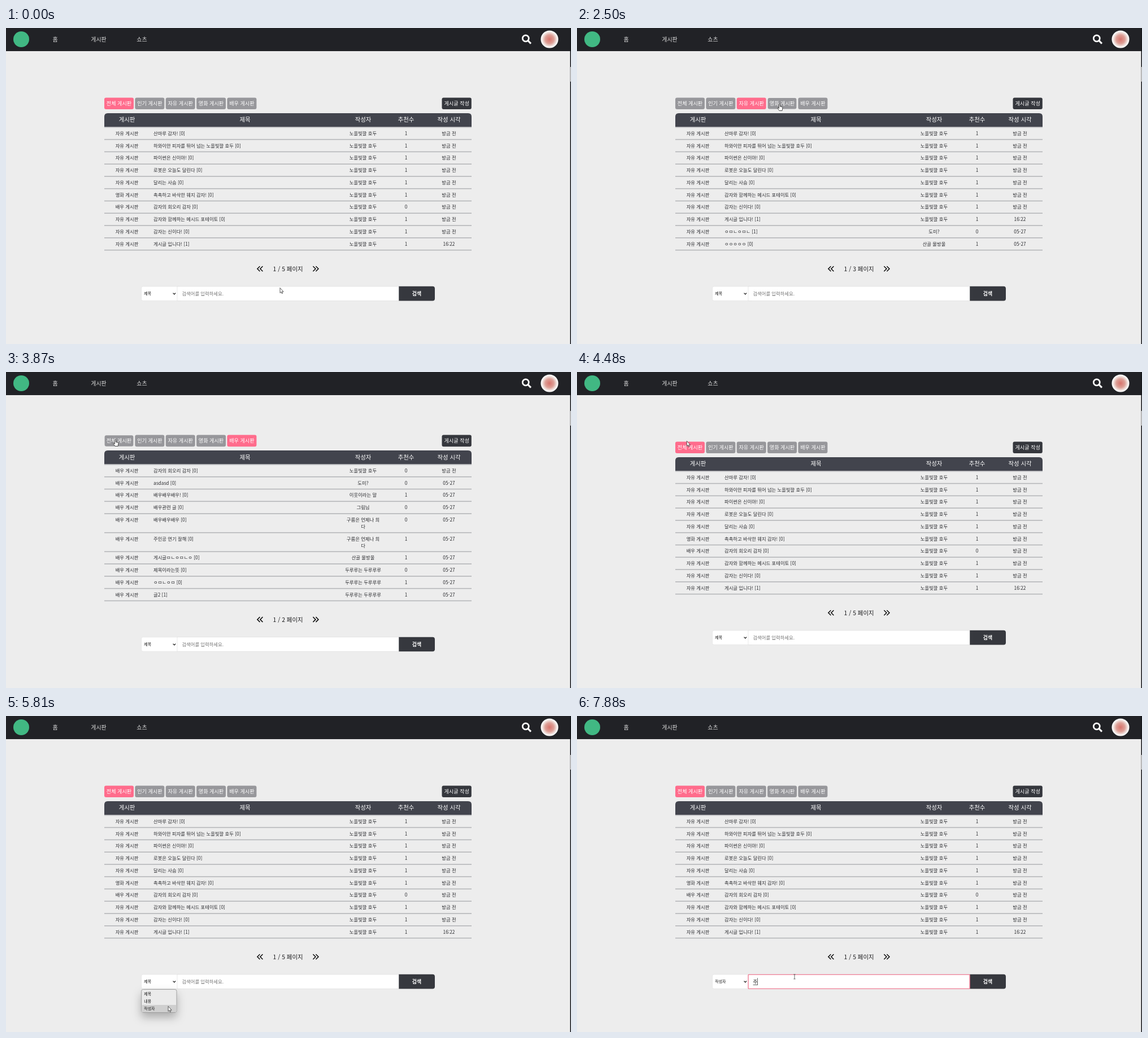
Animation of 1000x560 px, one loop 8000 ms. Source, as an HTML page:

```html
<!DOCTYPE html>
<html lang="ko">
<head>
<meta charset="utf-8">
<title>게시판</title>
<style>
html, body { margin: 0; width: 100%; height: 100%; overflow: hidden; background: #ededed; }
svg { display: block; width: 1000px; height: 560px; }
text { font-family: "Noto Sans CJK KR", "Noto Sans CJK", "Noto Sans CJK JP", "Noto Sans", sans-serif; white-space: pre; }
</style>
</head>
<body>
<svg viewBox="0 0 1000 560">
  <defs>
    <radialGradient id="avatar">
      <stop offset="0" stop-color="#d8736c"/><stop offset=".5" stop-color="#dda097"/>
      <stop offset=".85" stop-color="#f6efec"/><stop offset="1" stop-color="#fff"/>
    </radialGradient>
    <filter id="shadow" x="-60%" y="-60%" width="220%" height="240%">
      <feDropShadow dx="0" dy="8" stdDeviation="8" flood-opacity=".28"/>
    </filter>
  </defs>
  <rect width="1000" height="560" fill="#ededed"/>
  <g id="page"></g>
  <g id="pointer">
    <circle id="press" r="6" fill="#e8e000" opacity=".75"/>
    <path id="cursor"/>
  </g>
</svg>
<script>
const LOOP = 8000;
const $ = id => document.getElementById(id);

// Fields: board | title | author ("/" breaks the line) | likes | time
const ME = '노을빛깔 호두';
const mine = (board, title, likes = 1, time = '방금 전') => `${board}|${title}|${ME}|${likes}|${time}`;
const old = (board, title, author, likes) => `${board}|${title}|${author}|${likes}|05-27`;

const post = {
  hill: mine('자유', '산마루 감자! [0]'),
  pizza: mine('자유', `하와이안 피자를 뛰어 넘는 ${ME} [0]`),
  python: mine('자유', '파이썬은 신이야! [0]'),
  robot: mine('자유', '로봇은 오늘도 달린다 [0]'),
  deer: mine('자유', '달리는 사슴 [0]'),
  wedge: mine('영화', '촉촉하고 바삭한 웨지 감자! [0]'),
  twist: mine('배우', '감자의 회오리 감자 [0]', 0),
  mashed: mine('자유', '감자와 함께하는 메시드 포테이토 [0]'),
  god: mine('자유', '감자는 신이다! [0]'),
  first: mine('자유', '게시글 입니다! [1]', 1, '16:22')
};
const pick = names => names.split(' ').map(n => post[n]);
const CLOUD = '구름은 언제나 희/다', DURU = '두루루는 두루루루', DROP = '산골 물방울';

const boards = [
  { name: '전체', pages: 5, rows: pick('hill pizza python robot deer wedge twist mashed god first') },
  { name: '인기', pages: 1, rows: pick('first god mashed wedge deer robot python pizza hill twist') },
  { name: '자유', pages: 3, rows: [...pick('hill pizza python robot deer mashed god first'),
    old('자유', 'ㅇㅁㄴㅇㅁㄴ [1]', '도미?', 0), old('자유', 'ㅇㅇㅇㅇㅇ [0]', DROP, 1)] },
  { name: '영화', pages: 2, rows: [post.wedge,
    old('영화', 'asdasd [0]', '도미?', 0), old('영화', '영화영화영화! [0]', '이웃이라는 말', 1),
    old('영화', '영화 추천 글 [0]', CLOUD, 0), old('영화', '영화관련 글 [0]', '그림님', 1),
    old('영화', '영화 재밌다 [0]', CLOUD, 1), old('영화', '게시글ㅁㄴㅇ [0]', DROP, 1),
    old('영화', '제목이라는뜻 [0]', DURU, 0), old('영화', 'ㅇㅁㄴㅇ [0]', DURU, 1), old('영화', '글1 [0]', DURU, 0)] },
  { name: '배우', pages: 2, rows: [post.twist,
    old('배우', 'asdasd [0]', '도미?', 0), old('배우', '배우배우배우! [0]', '이웃이라는 말', 1),
    old('배우', '배우관련 글 [0]', '그림님', 0), old('배우', '배우배우배우 [0]', CLOUD, 0),
    old('배우', '주인공 연기 잘해 [0]', CLOUD, 1), old('배우', '게시글ㅁㄴㅇㅁㄴㅇ [0]', DROP, 1),
    old('배우', '제목이라는뜻 [0]', DURU, 0), old('배우', 'ㅇㅁㄴㅇㅁ [0]', DURU, 1), old('배우', '글2 [1]', DURU, 1)] }
];

// Timelines: [start, value]
const boardTimes = [[0, 0], [1230, 1], [2060, 2], [2970, 3], [3660, 4], [4420, 0]];
const optionTimes = [[0, -1], [5080, 0], [5240, 1], [5780, 2]];
const typedTimes = [[0, ''], [7780, 'ㅈ'], [7880, '주']];
const caretTimes = [[0, 0], [6480, 1], [7010, 0], [7550, 1]];
const presses = [[1140, 1230], [1960, 2050], [2800, 2940], [3580, 3650], [4330, 4410], [4880, 4950], [6020, 6100], [6450, 6570]];
// Pointer moves: start, end, x, y
const moves = [
  [0, 0, 485, 460.5], [30, 270, 246.5, 133.5], [1520, 1850, 306, 134], [2180, 2480, 358.5, 134.5],
  [3030, 3380, 412, 112.5], [3680, 3860, 193.5, 119.5], [4460, 4860, 294.5, 473], [5090, 5180, 293, 485],
  [5210, 5280, 291, 494], [5720, 5850, 286, 520], [6140, 6430, 352.5, 482.5], [6570, 6810, 371, 473], [6840, 7010, 385, 462]
];

const shapes = {
  arrow: ['M0 0V9L2 7.2 3.3 10.2 4.7 9.6 3.4 6.8H6.1Z', '#fff', '#333'],
  hand: ['M-1 1Q0-.7 1 1V4.6L4.6 5.4Q5.6 5.8 5.4 7L4.6 12H-.4L-3.4 8Q-3.6 6.6-2.4 6.8L-1 8Z', '#fff', '#222'],
  beam: ['M-1.6-4H1.6M0-4V4M-1.6 4H1.6', 'none', '#444']
};

const valueAt = (steps, t) => steps.filter(s => s[0] <= t).pop()[1];
const ease = p => p * p * (3 - 2 * p);

function pointerAt(t) {
  let x, y;
  for (const [from, to, mx, my] of moves) {
    if (t < from) break;
    const p = t >= to ? 1 : ease((t - from) / (to - from));
    x = p === 1 ? mx : x + (mx - x) * p;
    y = p === 1 ? my : y + (my - y) * p;
  }
  return [x, y];
}

const rect = (x, y, w, h, fill, r = 0, more = '') =>
  `<rect x="${x}" y="${y}" width="${w}" height="${h}" rx="${r}" fill="${fill}" ${more}/>`;
const path = (d, stroke, width, fill = 'none') =>
  `<path d="${d}" fill="${fill}" stroke="${stroke}" stroke-width="${width}"/>`;
// y is the optical middle of the line
const label = (s, x, y, size, fill, anchor = 'middle', weight = 400) =>
  `<text x="${x}" y="${(y + size * .37).toFixed(2)}" font-size="${size}" fill="${fill}" text-anchor="${anchor}" font-weight="${weight}">${s}</text>`;

const TAB = { x: 174, step: 54.35, w: 52, h: 20.7 };
const ROW = 21.78, LINE = 11.85;
const isTall = row => row.includes('/');
const shiftOf = board => board.rows.filter(isTall).length * LINE / 2;

function navbar() {
  return rect(0, 0, 1000, 41, '#212226') + rect(998.5, 0, 1.5, 560, '#15161a') + rect(998.5, 69, 1.5, 26, '#c9c9c9')
    + '<circle cx="27" cy="20" r="14" fill="#41b883"/><circle cx="962" cy="20" r="15.5" fill="url(#avatar)"/>'
    + [['홈', 87], ['게시판', 164], ['쇼츠', 240.5]].map(([s, x]) => label(s, x, 20, 10, '#dcdcdc', 'middle', 500)).join('')
    + '<circle cx="919.8" cy="18.4" r="5.5" fill="none" stroke="#fff" stroke-width="2.7"/>' + path('M923.8 22.4L929 27.6', '#fff', 3);
}

function tabs(active, hover, y) {
  return boards.map((b, i) => {
    const x = TAB.x + i * TAB.step, inset = i === hover ? .6 : 0;
    return rect(x + inset, y + inset, TAB.w - 2 * inset, TAB.h - 2 * inset, i === active ? '#ff6c8c' : '#97979b', 3)
      + label(`${b.name} 게시판`, x + TAB.w / 2, y + 10.4, 9.1, '#fff', 'middle', 500);
  }).join('') + rect(771.5, y, 52.3, TAB.h, '#35373d', 3) + label('게시글 작성', 797.7, y + 10.4, 9.1, '#fff', 'middle', 500);
}

function table(rows, top) {
  let out = path(`M174 ${top + 24.5}V${top + 6}q0-6 6-6H818q6 0 6 6V${top + 24.5}Z`, 'none', 0, '#42444d');
  [['게시판', 214], ['제목', 423], ['작성자', 632], ['추천수', 708], ['작성 시각', 784]]
    .forEach(([s, x]) => out += label(s, x, top + 11.7, 10.4, '#fff', 'middle', 500));
  const rule = y => rect(174, y - .8, 650, 1.6, '#b5b6b9');
  let y = top + 24.9;
  out += rule(y);
  for (const row of rows) {
    const [board, title, author, likes, time] = row.split('|');
    const mid = y + 10.9, cell = (s, x, dy = 0, anchor) => label(s, x, mid + dy, 8.33, '#2c2d31', anchor);
    out += cell(`${board} 게시판`, 214) + cell(title, 261, 0, 'start') + cell(likes, 708) + cell(time, 784);
    author.split('/').forEach((part, i) => out += cell(part, 632, i * LINE));
    y += ROW + (isTall(row) ? LINE : 0);
    out += rule(y);
  }
  return out;
}

function pager(pages, y) {
  const chevrons = (x, d) => [0, 5].map(o => path(`M${x + d * o} ${y - 4.5}l${-d * 4.5} 4.5l${d * 4.5} 4.5`, '#111', 1.6)).join('');
  return chevrons(449.4, 1) + label(`1 / ${pages} 페이지`, 499, y + .3, 10.4, '#1c1c1e') + chevrons(548.4, -1);
}

function search(s, y) {
  let out = rect(239.5, y, 70, 25.3, '#fff', 3, 'stroke="#dedede" stroke-width=".6"')
    + rect(303, y, 392.5, 25.3, '#fff', 0, 'stroke="#dadada" stroke-width=".6"')
    + label(s.picked, 244.3, y + 12.5, 6.94, '#111', 'start')
    + path(`M295.6 ${y + 11.7}l2.3 2.3l2.3-2.3`, '#111', 1.2)
    + path(`M695.3 ${y - .2}H755q4 0 4 4V${y + 21.5}q0 4-4 4H695.3Z`, 'none', 0, '#36383e')
    + label('검색', 727, y + 12.9, 8.9, '#fff', 'middle', 700);
  if (s.focus) out += rect(303.1, y + .2, 392, 25, '#fff', 1, 'stroke="#f0627f" stroke-width="1.1"');
  out += s.typed
    ? label(s.typed, 311.6, y + 12.9, 8.33, '#111', 'start') + rect(311.6, y + 18.2, 7.7, .7, '#222')
    : label('검색어를 입력하세요.', 311.4, y + 12.9, 8.33, '#757575', 'start');
  if (s.caret) out += rect(s.typed ? 319 : 311.2, y + 6.3, .7, 12.7, '#222');
  if (s.open) {
    out += rect(239.7, 484.5, 62.3, 41, '#ebebeb', 3, 'stroke="#8e8e8e" stroke-width=".8" filter="url(#shadow)"');
    if (s.option >= 0) out += rect(240.3, 486 + s.option * 13, 61, 13, '#cfcfcf', 1)
      + ['제목', '내용', '작성자'].map((n, i) => label(n, 244.3, 492.5 + i * 13, 6.94, '#111', 'start')).join('');
  }
  return out;
}

let lastKey;
function draw(t) {
  const [x, y] = pointerAt(t);
  const active = valueAt(boardTimes, t), board = boards[active], shift = shiftOf(board);
  const tabTop = 123.4 - shift;
  const slot = Math.floor((x - TAB.x) / TAB.step);
  const hover = y >= tabTop && y <= tabTop + TAB.h && slot >= 0 && slot < 5 ? slot : -1;
  const state = {
    picked: t < 6100 ? '제목' : '작성자', open: t >= 4950 && t < 6100, option: valueAt(optionTimes, t),
    focus: t >= 6450, typed: valueAt(typedTimes, t), caret: valueAt(caretTimes, t)
  };
  const key = JSON.stringify([active, hover, state]);
  if (key !== lastKey) {
    lastKey = key;
    $('page').innerHTML = navbar() + tabs(active, hover, tabTop) + table(board.rows, 150.9 - shift)
      + pager(board.pages, 426.8 + shift) + search(state, 458 + shift);
  }
  const inField = t > 6100 && x > 303 && y < 484;
  const [d, fill, stroke] = shapes[hover >= 0 ? 'hand' : inField ? 'beam' : 'arrow'];
  const cursor = $('cursor');
  cursor.setAttribute('d', d);
  cursor.setAttribute('fill', fill);
  cursor.setAttribute('stroke', stroke);
  cursor.setAttribute('stroke-width', .8);
  $('press').setAttribute('visibility', presses.some(([a, b]) => t >= a && t < b) ? 'visible' : 'hidden');
  $('pointer').setAttribute('transform', `translate(${x.toFixed(2)} ${y.toFixed(2)})`);
}

const begin = performance.now();
function tick() {
  draw((performance.now() - begin) % LOOP);
  requestAnimationFrame(tick);
}
tick();
</script>
</body>
</html>
```
